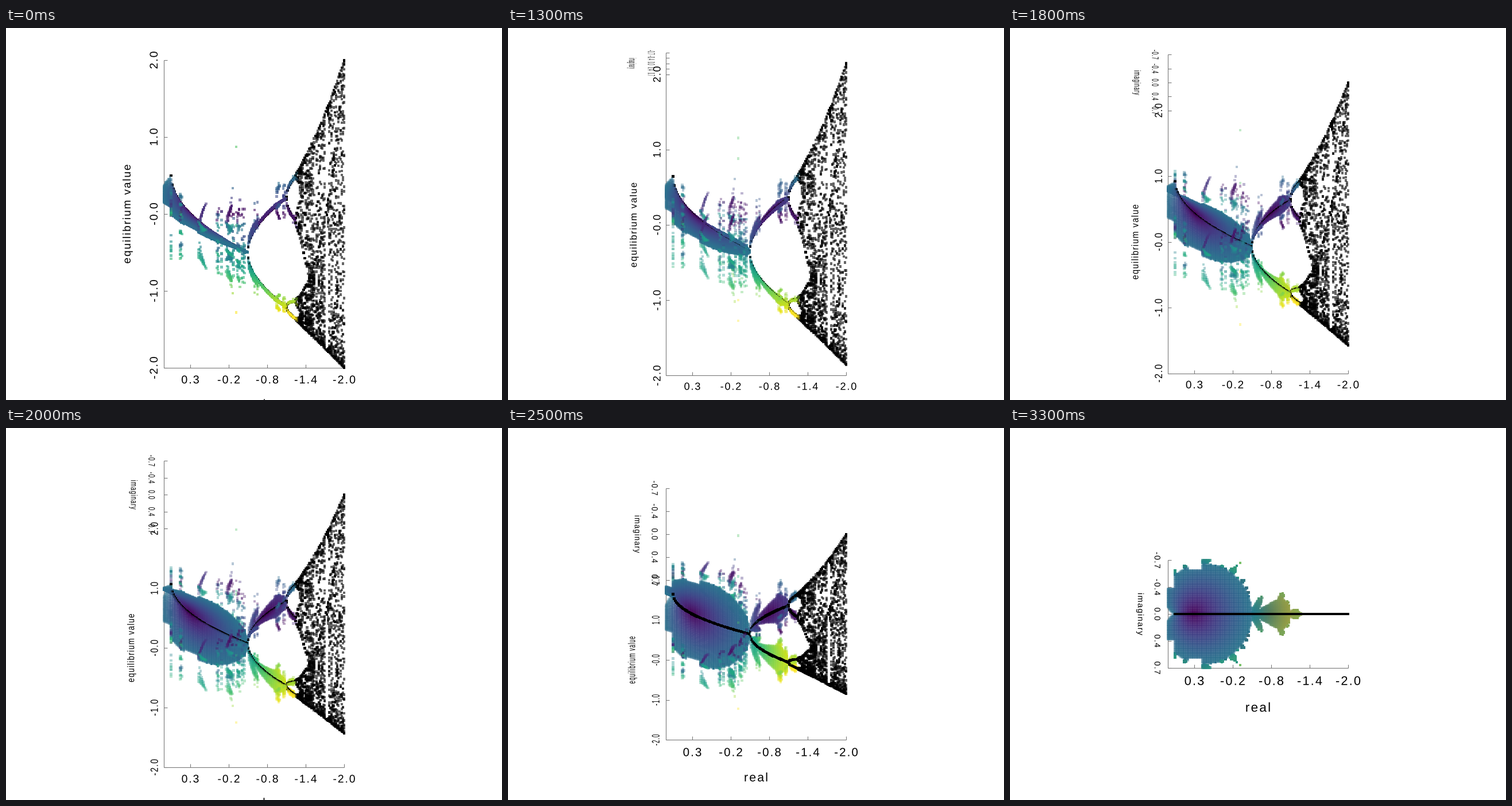
Recreate the animation shown at these times as a matplotlib script. Size 864 by 648 pixels, loop 4.4 s.

```python
import numpy as np
import matplotlib.pyplot as plt
from matplotlib.animation import FuncAnimation
from matplotlib.collections import LineCollection
from matplotlib.patches import PathPatch
from matplotlib.path import Path
from matplotlib.textpath import TextPath
from matplotlib.transforms import Affine2D

W, H, DPI = 864, 648, 100
UNIT = 134.0              # pixels per unit on every axis
X0, MID = 321, 324        # screen position of the coordinate origin
LEFT, RIGHT = 275, 589
IM_MAX = 0.7
FRAMES, HOLD, STEPS = 44, 10, 23
FONT = {"family": "Liberation Sans"}
SPACING = 0.1             # extra letter spacing in em
DOT = 4.5

rng = np.random.default_rng(4)


# ---------- data ----------
def trimmed(re, im):
    """Places along the rim of the set that stay empty."""
    x, h = X0 - UNIT * re, UNIT * im
    cusp = (x < 286) & (im > 0.335)
    shoulder = (x > 311) & (x < 335) & (im > 0.575)
    notch = ((x > 434 + 0.3 * (h - 8)) & (x < 468)
             & (h > 8 + 0.55 * (x - 435)))
    return cusp | shoulder | notch


def set_points(step=1.6 / UNIT, max_period=16):
    re, im = np.meshgrid(np.arange(0.345, -1.42, -step),
                         np.arange(step / 2, IM_MAX + 0.003, step),
                         indexing="ij")
    re, im = re.ravel(), im.ravel()
    keep = ~trimmed(re, im)
    c = re[keep] + 1j * im[keep]
    z = np.zeros_like(c)
    for _ in range(1200):
        z = z * z + c
        ok = np.abs(z) < 2
        z, c = z[ok], c[ok]
    orbit = [z]
    for _ in range(max_period):
        orbit.append(orbit[-1] ** 2 + c)
    orbit = np.array(orbit)
    close = np.abs(orbit[1:] - orbit[0]) < 2e-3
    period = np.where(close.any(0), close.argmax(0) + 1, 0)
    rows = [(c[i].real, c[i].imag, orbit[j, i].real, abs(orbit[j, i]))
            for i in range(len(c)) for j in range(period[i])]
    half = np.array(rows)
    mirror = half * [1, -1, 1, 1]
    return np.stack([half, mirror], 1).reshape(-1, 4)


def real_points(columns=151, per_column=50):
    c = np.linspace(0.25, -2, columns)
    z = rng.uniform(-0.3, 0.3, columns)
    for _ in range(600):
        z = z * z + c
    out = []
    for _ in range(per_column):
        z = z * z + c
        out.append(np.column_stack([c, 0 * c, z]))
    return np.concatenate(out)


cloud = set_points()
line = real_points()
colors = plt.cm.viridis(np.clip(cloud[:, 3] / 1.3, 0, 1))
colors[:, 3] = 0.35
rgba = np.vstack([colors, np.tile([0, 0, 0, 0.6], (len(line), 1))])
xyz = np.vstack([cloud[:, :3], line])
is_line = np.arange(len(xyz)) >= len(cloud)

# ---------- stage ----------
fig = plt.figure(figsize=(W / DPI, H / DPI), dpi=DPI, facecolor="white")
ax = fig.add_axes([0, 0, 1, 1])
ax.set_xlim(0, W)
ax.set_ylim(H, 0)
ax.axis("off")

axes_lines = LineCollection([], colors="#7a7a7a", linewidths=0.8, zorder=1)
ax.add_collection(axes_lines)
dots = ax.scatter(xyz[:, 0], xyz[:, 1], s=(DOT * 72 / DPI) ** 2, marker="s",
                  c=rgba, linewidths=0, zorder=2)


# ---------- text ----------
def right_edge(s):
    return TextPath((0, 0), s, size=100, prop=FONT).get_extents().x1


def label_path(s):
    """Letter-spaced text, one em high, centred on the origin."""
    bar, x, parts = right_edge("|"), 0.0, []
    for ch in s:
        if ch != " ":
            parts.append(TextPath((x, 0), ch, size=100, prop=FONT))
        x += right_edge(ch + "|") - bar + 100 * SPACING
    path = Path.make_compound_path(*parts)
    mid = (x - 100 * SPACING) / 2
    return Path((path.vertices - [mid, 36]) / 100, path.codes)


class Label:
    def __init__(self, text, size, direction):
        self.size, self.direction = size, direction
        self.patch = PathPatch(label_path(text), fc="black", lw=0, zorder=3)
        ax.add_patch(self.patch)

    def place(self, x, y, scale=1, squash=1):
        self.patch.set_visible(squash > 0.02)
        s = self.size * scale
        a, b, c, d = {"flat": (s, 0, 0, -s),
                      "up": (0, -s * squash, -s, 0),
                      "down": (0, s * squash, s, 0)}[self.direction]
        self.patch.set_transform(
            Affine2D.from_values(a, b, c, d, x, y) + ax.transData)


def tick_labels(texts, size, direction):
    return [Label(t, size, direction) for t in texts.split()]


re_ticks = tick_labels("0.3 -0.2 -0.8 -1.4 -2.0", 19.8, "flat")
z_ticks = tick_labels("-2.0 -1.0 -0.0 1.0 2.0", 19.5, "up")
im_ticks = tick_labels("-0.7 -0.4 0.0 0.4 0.7", 14.4, "down")
re_name = Label("real", 20.5, "flat")
z_name = Label("equilibrium value", 19, "up")
im_name = Label("imaginary", 14.4, "down")

RE_X = np.linspace(X0, RIGHT, 5)
Z_VALUES = np.linspace(-2, 2, 5)
IM_VALUES = np.linspace(-IM_MAX, IM_MAX, 5)
KEYS = [0, 1, 5, 10, 15, 19, 23]


def at(k, *values):
    return np.interp(k, KEYS, values)


# ---------- motion ----------
def draw(i):
    k = min(max(i - HOLD, 0), STEPS)
    angle = np.pi / 2 * k / STEPS
    cos, sin = np.cos(angle), np.sin(angle)

    def height(im, z):
        return MID - UNIT * z * cos + UNIT * im * sin

    re, im, z = xyz.T
    depth = im * cos + np.where(is_line, 0.03 * sin ** 2, 0)
    order = np.argsort(depth, kind="stable")
    xy = np.column_stack([X0 - UNIT * re, height(im, z)])
    dots.set_offsets(xy[order])
    dots.set_facecolors(rgba[order])

    z_y = height(IM_MAX, Z_VALUES)
    im_y = height(IM_VALUES, 2)
    base = z_y[0]
    segs = [[(LEFT, base), (RIGHT, base)], [(LEFT, im_y[0]), (LEFT, base)]]
    segs += [[(x, base), (x, base - 6)] for x in RE_X]
    if cos > 0.02:
        segs += [[(LEFT, y), (LEFT + 6, y)] for y in z_y]
    if sin > 0.02:
        segs += [[(LEFT, y), (LEFT + 6, y)] for y in im_y]
    axes_lines.set_segments(segs)

    s = at(k, 1, 0.9, 0.93, 0.975, 1.04, 1.07, 1.1)
    for lab, x in zip(re_ticks, RE_X):
        lab.place(x, base + 20 * s, s)
    re_name.place((LEFT + RIGHT) / 2, base + 62 * s, s)

    s = at(k, 1, 0.87, 0.88, 0.89, 0.92, 0.94, 0.94)
    for lab, y in zip(z_ticks, z_y):
        lab.place(LEFT - at(k, 18, 16, 16, 17, 18, 20, 20), y,
                  (1 + s) / 2, cos)
    z_name.place(LEFT - 65 * s, z_y.mean(), s, cos)

    s = at(k, 1.3, 1.3, 1.16, 1.1, 1.04, 1.01, 1)
    for lab, y in zip(im_ticks, im_y):
        lab.place(LEFT - 18 * s ** 1.6, y, s, sin)
    im_name.place(LEFT - 47 * s, im_y.mean(), s, sin)
    return []


anim = FuncAnimation(fig, draw, frames=FRAMES, interval=100, repeat=True,
                     repeat_delay=0, blit=False)
plt.show()
```
